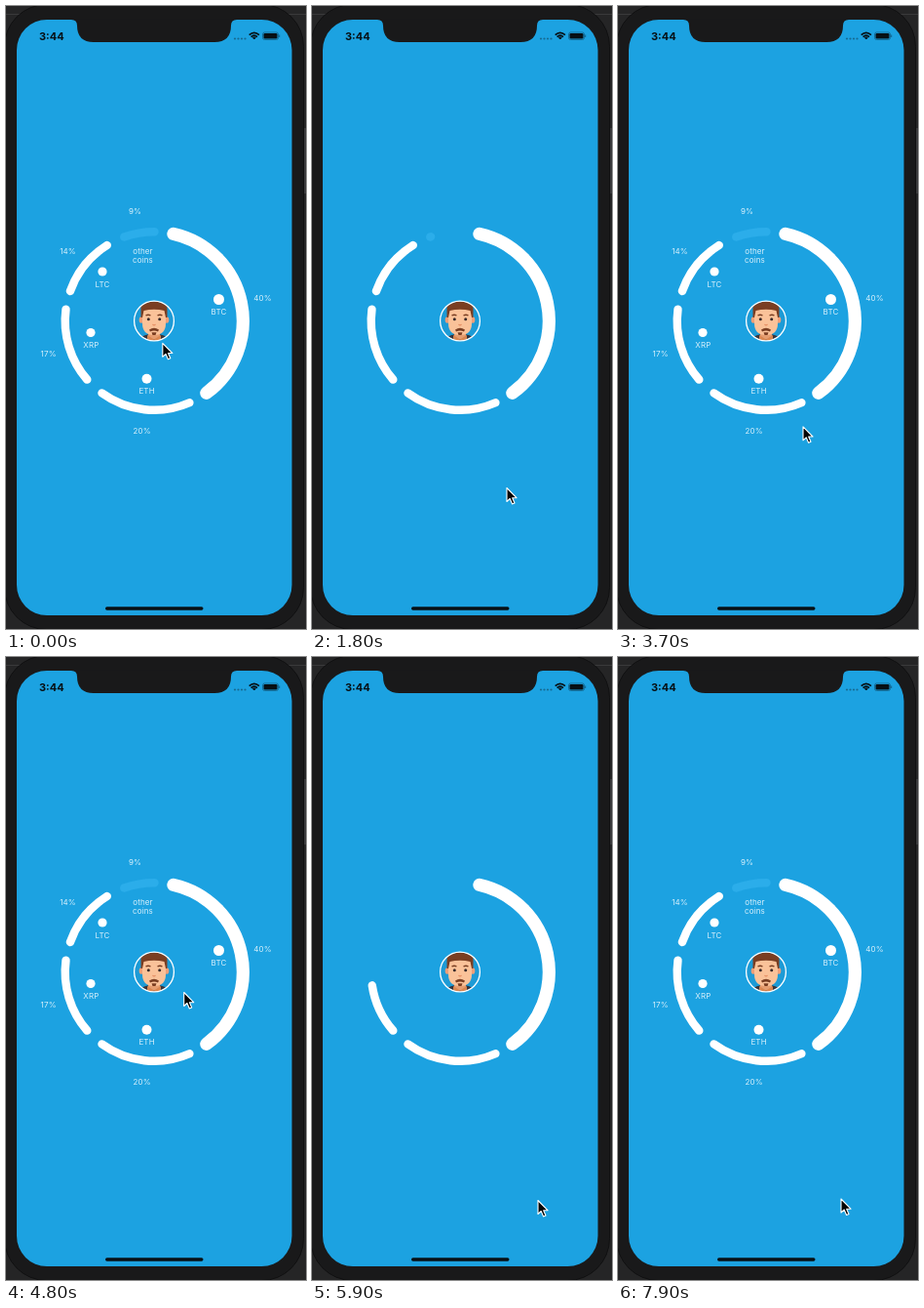
An HTML page that plays this animation: 308 px wide and 638 px high, repeating every 8 s.

```html
<!DOCTYPE html>
<html lang="en">
<head>
<meta charset="utf-8">
<title>Portfolio ring</title>
<style>
  html, body { margin: 0; width: 100%; height: 100%; overflow: hidden; background: #1a1a1b; }
  svg { display: block; width: 308px; height: 638px; }
  text { font-family: Inter, Roboto, sans-serif; }
  #labels text { font-size: 8px; letter-spacing: .15px; fill: #d9f0fb; text-anchor: middle; }
</style>
</head>
<body>
<svg viewBox="0 0 308 638">
  <defs>
    <clipPath id="round"><circle cx="152" cy="322.5" r="20"/></clipPath>
  </defs>

  <!-- desktop and phone body -->
  <rect width="308" height="638" fill="#252526"/>
  <path d="M0 8.5H308" stroke="#3a3a3b"/>
  <rect x="304" y="125" width="4" height="67" fill="#3a3a3c"/>
  <rect x="-1.5" y="-1.5" width="307" height="640" rx="43" fill="#19191a" stroke="#101011"/>
  <rect x="11" y="14" width="282.500" height="610" rx="31" fill="#1ca2e1"/>
  <path d="M67 13.500H237V14Q231 14 231 20Q231 37 214 37H90Q73 37 73 20Q73 14 67 14Z" fill="#19191a"/>

  <!-- status bar -->
  <text x="34" y="34.700" font-size="11" font-weight="700" fill="#071015">3:44</text>
  <g fill="#176b93">
    <circle cx="235" cy="33.500" r="1.100"/><circle cx="238.500" cy="33.500" r="1.100"/>
    <circle cx="242" cy="33.500" r="1.100"/><circle cx="245.500" cy="33.500" r="1.100"/>
  </g>
  <g fill="none" stroke="#071015" stroke-width="1.700">
    <path d="M249.700 29.600Q254.800 25 259.900 29.600M251.600 31.700Q254.800 28.800 258 31.700"/>
    <path d="M253.300 32.500L254.800 34L256.300 32.500Q254.800 31.300 253.300 32.500Z" stroke-width=".8" fill="#071015"/>
  </g>
  <rect x="263.500" y="27" width="16" height="7.500" rx="2" fill="none" stroke="#12628a" stroke-width=".8"/>
  <rect x="264.500" y="28" width="14" height="5.500" rx="1.200" fill="#071015"/>
  <path d="M280.700 29.500V32" stroke="#12628a"/>
  <rect x="102" y="615.300" width="100.500" height="3.400" rx="1.700" fill="#071015"/>

  <g id="ring" fill="none" stroke-linecap="round"></g>
  <g id="labels"></g>

  <!-- avatar -->
  <circle cx="152" cy="322.500" r="20.500" fill="#1d9bd6"/>
  <g clip-path="url(#round)">
    <path d="M136 345Q137 338 145 336.500H159Q167 338 168 345Z" fill="#39343a"/>
    <path d="M146 331H158V339Q152 344 146 339Z" fill="#e59d70"/>
    <path d="M145 337L152 341.500L159 337V345H145Z" fill="#d98650"/>
    <ellipse cx="139" cy="321.500" rx="2.300" ry="3.300" fill="#ef9f78"/>
    <ellipse cx="165" cy="321.500" rx="2.300" ry="3.300" fill="#ef9f78"/>
    <path d="M140 309H164V325Q164 337 152 337Q140 337 140 325Z" fill="#fac299"/>
    <path d="M138.500 319V309Q139 302.500 147 302.500H158Q165.500 303 165.500 310V319H164L162.500 312Q152 309.500 141.500 312L140 319Z" fill="#7a3e22"/>
    <path d="M147 331.500Q152 328 157 331.500L156 333.500Q152 331.500 148 333.500ZM149.500 334.300H154.500L153.500 337H150.500Z" fill="#7a3e22"/>
    <path d="M143.500 317Q146 315.500 148.500 317M155.500 317Q158 315.500 160.500 317" fill="none" stroke="#7a3e22" stroke-width="1.300"/>
    <circle cx="146.300" cy="320.800" r="1.500" fill="#3a2b2b"/>
    <circle cx="157.700" cy="320.800" r="1.500" fill="#3a2b2b"/>
    <path d="M150.500 326Q152 327.500 153.500 326" fill="none" stroke="#e59065" stroke-width="1.200"/>
  </g>
  <circle cx="152" cy="322.500" r="20.400" fill="none" stroke="#fff" stroke-width="1.300"/>

  <path id="cursor" d="M0 0V14L3.200 11L5.600 16.500L8 15.500L5.700 10.200H10Z"
        fill="#050505" stroke="#fff" stroke-width="1.100" stroke-linejoin="round"/>
</svg>
<script>
const LOOP = 8000, DRAW = 1500, FADE = 350;
const STARTS = [420 - 4430, 420, 4850];
const CX = 152, CY = 322.5, R = 91.3;

// share, start angle, end angle (clockwise from top), width, colour
const arcs = [
  [40, 12.6, 143.9, 13.2, '#fff'],
  [20, 156.5, 215.9, 8.4, '#fff'],
  [17, 228.8, 277.5, 8.4, '#fff'],
  [14, 289.5, 328.1, 8.4, '#fff'],
  [9, 340.3, 360.3, 8.4, '#2badea'],
];
const words = [
  ['40%', 263.5, 302], ['20%', 139.6, 438], ['17%', 43.6, 358.5], ['14%', 63.5, 254], ['9%', 132.5, 213.3],
  ['BTC', 218.5, 316.4], ['ETH', 144.6, 397.4], ['XRP', 87.4, 350], ['LTC', 99, 287.5],
  ['other', 140.5, 254], ['coins', 140.5, 263.2],
];
const badges = [[218.5, 300.5, 5.5], [144.5, 381.7, 5], [87, 334.5, 4.6], [99, 272, 4.6]];
// time, x, y of the pointer
const track = [
  [0, 160.8, 345.3], [300, 160.8, 345.3], [1000, 195, 444.5], [1200, 197.5, 474], [1800, 200, 493.5],
  [2900, 200, 493.5], [3700, 190, 430.8], [4450, 163, 336], [4600, 163, 336], [4800, 182.7, 343.5],
  [5800, 232, 556.5], [6100, 232, 556.5], [6500, 229, 555], [LOOP, 229, 555],
];

const $ = id => document.getElementById(id);
const clamp = v => Math.min(1, Math.max(0, v));
const ease = p => p < .5 ? 2 * p * p : 1 - 2 * (1 - p) ** 2;

function add(parent, tag, attrs, text = '') {
  const el = document.createElementNS('http://www.w3.org/2000/svg', tag);
  for (const k in attrs) el.setAttribute(k, attrs[k]);
  el.textContent = text;
  return parent.appendChild(el);
}
const paths = arcs.map(a => add($('ring'), 'path', { 'stroke-width': a[3], stroke: a[4] }));
words.forEach(([s, x, y]) => add($('labels'), 'text', { x, y }, s));
badges.forEach(([cx, cy, r]) => add($('labels'), 'circle', { cx, cy, r, fill: '#fff' }));

function point(deg) {
  const a = deg * Math.PI / 180;
  return `${CX + R * Math.sin(a)} ${CY - R * Math.cos(a)}`;
}

function render(t) {
  const age = t - STARTS.findLast(s => s <= t);
  let begin = 0;
  arcs.forEach(([share, from, to], i) => {
    const span = DRAW * share / 100;
    const p = ease(clamp((age - begin) / span));
    const end = from + Math.max(.05, p * (to - from));
    paths[i].setAttribute('d', p > 0 ? `M${point(from)}A${R} ${R} 0 0 1 ${point(end)}` : '');
    begin += span;
  });
  $('labels').setAttribute('opacity', clamp((age - DRAW) / FADE));

  const n = track.findIndex(k => k[0] > t);
  const [t0, x0, y0] = track[n - 1], [t1, x1, y1] = track[n];
  const q = ease((t - t0) / (t1 - t0));
  $('cursor').setAttribute('transform', `translate(${x0 + (x1 - x0) * q} ${y0 + (y1 - y0) * q})`);
}

const origin = performance.now();
function tick() {
  render((performance.now() - origin) % LOOP);
  requestAnimationFrame(tick);
}
tick();
</script>
</body>
</html>
```
